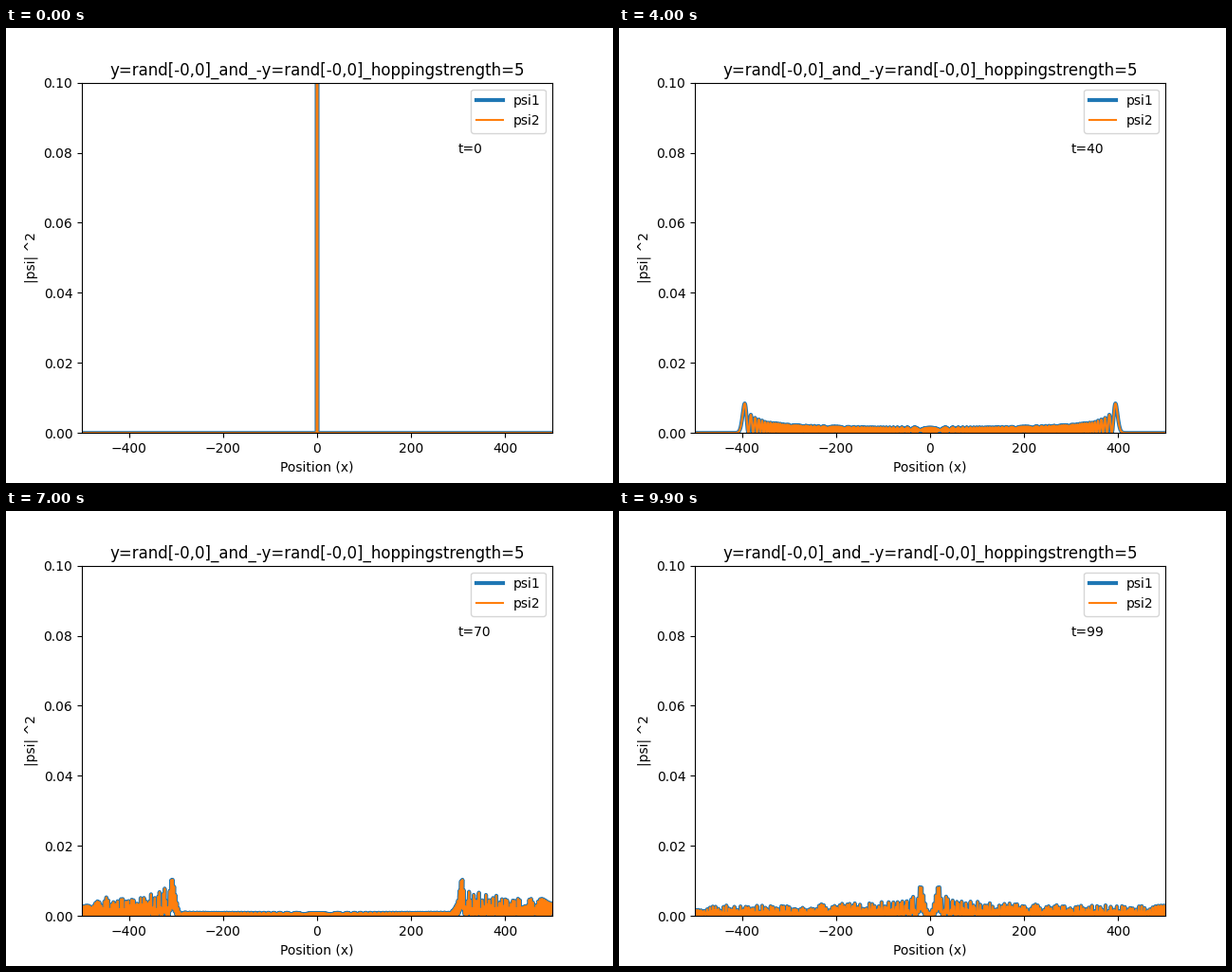
Recreate the animation shown at these times as a matplotlib script. Size 640x480 px, loop 10 s.

```python
import numpy as np
import matplotlib.pyplot as plt
from matplotlib.animation import FuncAnimation

SITES = 1000
HOPPING = 5
FRAMES = 100

# Open tight-binding chain: sine modes with energies 2 J cos(k)
site = np.arange(1, SITES + 1)
x = site - SITES // 2 - 1
k = np.pi * site / (SITES + 1)
modes = np.sqrt(2 / (SITES + 1)) * np.sin(np.outer(site, k))
energy = 2 * HOPPING * np.cos(k)
start = modes[SITES // 2]


def density(t):
    phase = energy * t
    re = modes @ (start * np.cos(phase))
    im = modes @ (start * np.sin(phase))
    return re**2 + im**2


fig, ax = plt.subplots(figsize=(6.4, 4.8), dpi=100)
ax.set_xlim(-500, 500)
ax.set_ylim(0, 0.1)
ax.set_xlabel("Position (x)")
ax.set_ylabel("|psi| ^2")
ax.set_title("y=rand[-0,0]_and_-y=rand[-0,0]_hoppingstrength=5")

psi1, = ax.plot(x, density(0), lw=3, label="psi1")
psi2, = ax.plot(x, density(0), lw=1.5, label="psi2")
clock = ax.text(300, 0.08, "t=0")
ax.legend(loc="upper right")


def update(t):
    p = density(t)
    psi1.set_ydata(p)
    psi2.set_ydata(p)
    clock.set_text(f"t={t}")
    return psi1, psi2, clock


anim = FuncAnimation(fig, update, frames=FRAMES, init_func=lambda: update(0),
                     interval=100, repeat=True, repeat_delay=0, blit=False)
plt.show()
```
